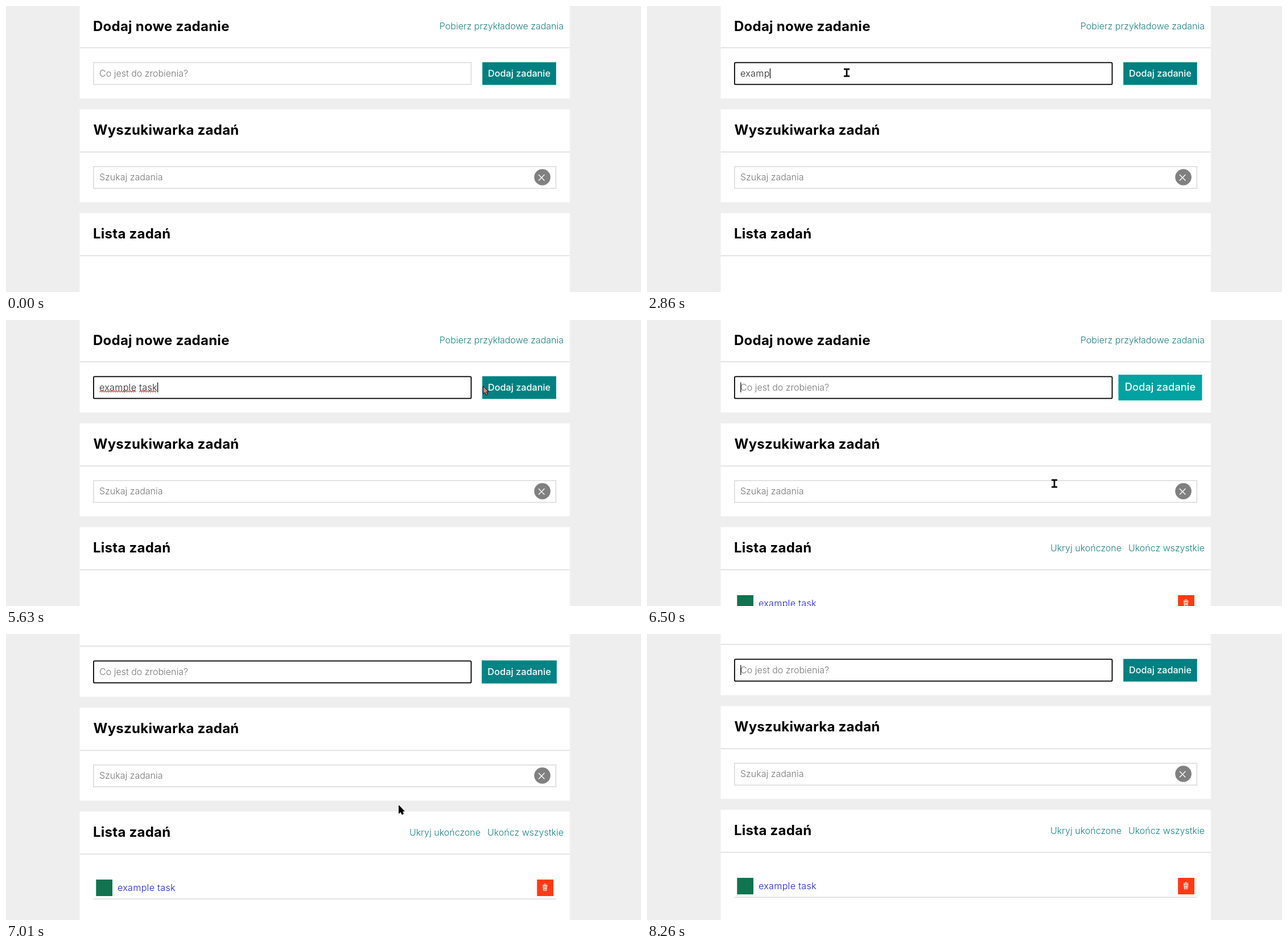
An HTML page for the animation above (8590 ms loop, 1116 by 502 pixels).

```html
<!DOCTYPE html>
<html lang="pl">
<head>
<meta charset="utf-8">
<title>Lista zadań</title>
<style>
  html, body { margin: 0; width: 100%; height: 100%; overflow: hidden; background: #eee; }
  svg { display: block; width: 1116px; height: 502px; }
  text { font-family: Inter, "Open Sans", sans-serif; font-size: 16px; font-weight: 350; white-space: pre; }
  .title { font-size: 24px; font-weight: 700; letter-spacing: .25px; }
  .link { fill: #1a8080; text-anchor: end; }
  .hint { fill: #757575; }
  .panel { fill: #fff; }
  .rule { fill: #ddd; }
  .field { fill: #fff; stroke: #ddd; stroke-width: 1.7; }
  .entry { font-size: 16.2px; font-weight: 300; letter-spacing: .25px; }
  .label { font-size: 16.2px; font-weight: 450; fill: #fff; text-anchor: middle; }
</style>
</head>
<body>
<svg viewBox="0 0 1116 502">
  <rect width="1116" height="502" fill="#eee"/>
  <g id="page">
    <rect class="panel" x="129.5" y="-20" width="861.3" height="182.3"/>
    <rect class="panel" x="129.5" y="181.5" width="861.3" height="163"/>
    <rect class="panel" x="129.5" y="363.5" width="861.3" height="240"/>
    <rect class="rule" x="129.5" y="72.5" width="861.3" height="1.6"/>
    <rect class="rule" x="129.5" y="255.5" width="861.3" height="1.6"/>
    <rect class="rule" x="129.5" y="437.5" width="861.3" height="1.6"/>

    <text class="title" x="153" y="44">Dodaj nowe zadanie</text>
    <text class="title" x="153.5" y="226">Wyszukiwarka zadań</text>
    <text class="title" x="153" y="408">Lista zadań</text>
    <text class="link" x="980" y="41">Pobierz przykładowe zadania</text>

    <rect class="field" x="153.9" y="99.3" width="663.6" height="38.4"/>
    <rect id="focus" x="153.9" y="99.3" width="663.6" height="38.4" rx="2" fill="#fff" stroke="#000" stroke-width="1.8"/>
    <text id="hint" class="hint" x="164" y="123.5">Co jest do zrobienia?</text>
    <text id="typed" class="entry" x="164" y="123.5" fill="#222"></text>
    <path id="wave" fill="none" stroke="#e8202a" stroke-width="1.1"/>
    <rect id="caret" y="109.5" width="1.2" height="17.5"/>

    <g id="button">
      <rect id="face" x="-64.8" y="-19.9" width="129.6" height="39.8"/>
      <text class="label" y="5">Dodaj zadanie</text>
    </g>

    <rect class="field" x="153.9" y="281.8" width="812.5" height="38.4"/>
    <text class="hint" x="164" y="305.5">Szukaj zadania</text>
    <circle cx="942.6" cy="300.5" r="14.3" fill="#808080"/>
    <path d="M936 296l10.4 10.4m0-10.4l-10.4 10.4" stroke="#fff" stroke-width="1.4"/>

    <g id="task">
      <text class="link" x="834" y="406">Ukryj ukończone</text>
      <text class="link" x="980" y="406">Ukończ wszystkie</text>
      <rect x="158.3" y="483" width="28.7" height="29" fill="#117350"/>
      <text class="entry" x="196" y="503" fill="#1b20d8">example task</text>
      <rect x="933.2" y="483" width="28.8" height="29" fill="#ff3a14"/>
      <path d="M943.8 494.5l.7 8h5.4l.7-8zm1.9 1.5v5m1.5-5v5m1.5-5v5M942.7 493.2h9m-6-.8v-1.4h3v1.4" fill="none" stroke="#fff" stroke-width="1"/>
      <rect class="rule" x="153.5" y="516.3" width="813" height="1.6"/>
    </g>
  </g>
  <path id="beam" d="M-5-6.2H5M-5 6.2H5M0-6V6" fill="none" stroke="#000" stroke-width="2.7"/>
  <path id="arrow" d="M.6 1V14.8L3.7 12L6 16.8L8.6 15.6L6.5 11H10.2Z" stroke="#000" stroke-width="1"/>
</svg>
<script>
const LOOP = 8590, WORD = "example task", TEXT_X = 164;
const FOCUS = 1100, CLICK = 6030, HOVER_IN = 5600, HOVER_OUT = 6400;
const KEYS = [1850, 2180, 2340, 2690, 2860, 3140, 3300, 3550, 3800, 4050, 4220, 4470];

// Screen updates: [first, last, count]
const UPDATES = [
  [0, 0, 1], [500, 1100, 8], [1680, 1680, 1], ...KEYS.map(k => [k, k, 1]),
  [4980, 5790, 11], [5870, 6670, 10], [6750, 7600, 11], [7680, 8260, 8]
];

// Pointer path: [time, x, y]
const PATH = [
  [500, 655, 300], [1100, 351, 117], [4900, 351, 117], [5628, 838, 115],
  [5790, 862, 118], [6230, 862, 118], [6403, 816, 184], [6492, 716, 287],
  [6670, 700, 296], [7005, 690, 300], [7250, 690, 300], [7600, 505, 428],
  [7930, 900, 436], [8180, 1056, 480]
];

const el = {};
document.querySelectorAll("[id]").forEach(n => el[n.id] = n);
const show = (node, on) => node.setAttribute("visibility", on ? "visible" : "hidden");
const clamp = v => Math.min(1, Math.max(0, v));
const mix = (a, b, p) => a + (b - a) * p;

function hold(t) {
  const [a, b, n] = UPDATES.filter(u => u[0] <= t).pop();
  if (n < 2 || t >= b) return b;
  const step = (b - a) / (n - 1);
  return a + Math.floor((t - a) / step) * step;
}

// CSS "ease"
function ease(x) {
  x = clamp(x);
  const bez = (s, p, q) => 3 * s * (1 - s) ** 2 * p + 3 * s * s * (1 - s) * q + s ** 3;
  let lo = 0, hi = 1;
  for (let i = 0; i < 24; i++) {
    const mid = (lo + hi) / 2;
    if (bez(mid, .25, .25) < x) lo = mid; else hi = mid;
  }
  return bez(lo, .1, 1);
}

// Smooth wheel scroll in whole pixels
function scrollAt(t) {
  const p = clamp((t - 6680) / 430);
  return Math.round(55 * (p < .5 ? 4 * p ** 3 : 1 - 4 * (1 - p) ** 3));
}

function pointerAt(t) {
  const i = PATH.findIndex(p => p[0] > t);
  if (i < 0) return PATH[PATH.length - 1].slice(1);
  const [a, b] = [PATH[Math.max(0, i - 1)], PATH[i]];
  const p = b[0] > a[0] ? (t - a[0]) / (b[0] - a[0]) : 0;
  return [mix(a[1], b[1], p), mix(a[2], b[2], p)];
}

const width = n => n ? el.typed.getSubStringLength(0, n) : 0;

function squiggle(from, to) {
  let d = `M${from} 126.5`;
  for (let x = from + 2, up = true; x <= to; x += 2, up = !up) d += `L${x} ${up ? 124.3 : 126.5}`;
  return d;
}

function drawInput(t) {
  const count = t < CLICK ? KEYS.filter(k => k <= t).length : 0;
  const last = [FOCUS, ...KEYS, CLICK].filter(k => k <= t).pop();
  const focused = t >= FOCUS;
  el.typed.textContent = WORD.slice(0, count);
  show(el.focus, focused);
  show(el.hint, !count);
  let d = count > 7 ? squiggle(TEXT_X + .5, TEXT_X + width(7)) : "";
  if (count === WORD.length && t >= 4980) d += squiggle(TEXT_X + width(8), TEXT_X + width(12));
  el.wave.setAttribute("d", d);
  el.caret.setAttribute("x", TEXT_X + .2 + width(count));
  show(el.caret, focused && Math.floor((t - last) / 500) % 2 === 0);
}

function drawButton(t) {
  const lift = ease((Math.min(t, HOVER_OUT) - HOVER_IN) / 1000) * (1 - ease((t - HOVER_OUT) / 1000));
  const tone = Math.round(mix(128, 166, lift));
  el.button.setAttribute("transform", `translate(902 118.6) scale(${1 + .15 * lift})`);
  el.face.setAttribute("fill", `rgb(0,${tone},${tone})`);
}

function drawPointer(t, scroll) {
  const [x, y] = pointerAt(t);
  const over = (l, top, r, b) => x >= l && x <= r && y + scroll >= top && y + scroll <= b;
  const visible = t >= 500 && t < 8250;
  const beam = over(153, 98, 818, 138) || over(153, 281, 928, 320);
  const hot = over(837, 98, 967, 139) || over(933, 483, 962, 512);
  for (const n of [el.beam, el.arrow]) n.setAttribute("transform", `translate(${x} ${y})`);
  show(el.beam, visible && beam);
  show(el.arrow, visible && !beam);
  el.arrow.setAttribute("fill", hot ? "#f47b78" : "#000");
}

function draw(time) {
  const t = hold(time % LOOP);
  const scroll = scrollAt(t);
  el.page.setAttribute("transform", `translate(0 ${-scroll})`);
  show(el.task, t >= CLICK);
  drawInput(t);
  drawButton(t);
  drawPointer(t, scroll);
}

const start = performance.now();
function tick() {
  draw(performance.now() - start);
  requestAnimationFrame(tick);
}
tick();
</script>
</body>
</html>
```
